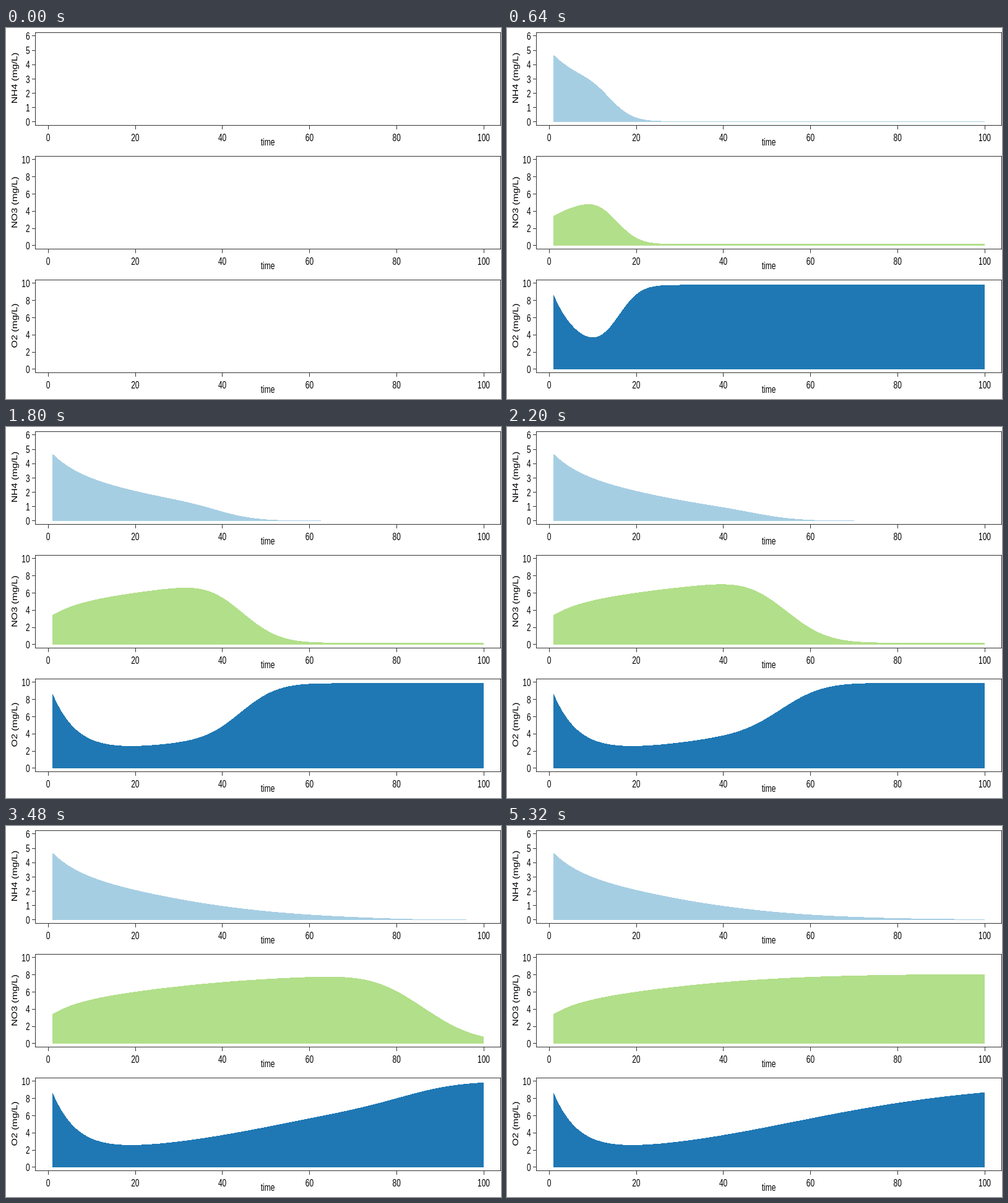
Write an HTML page that moves like this. It is 800x600 px and loops after 6040 ms.

```html
<!DOCTYPE html>
<html lang="en">
<head>
<meta charset="utf-8">
<title>Nitrification along a stream</title>
<style>
  html, body { margin: 0; width: 100%; height: 100%; overflow: hidden; background: #fff; }
  svg { display: block; width: 100vw; height: 100vh; }
  text { font: 16px "Liberation Sans", Arial, sans-serif; fill: #000; }
  .line { fill: none; stroke: #333; shape-rendering: crispEdges; }
  .area { shape-rendering: crispEdges; }
</style>
</head>
<body>
<svg id="stage" viewBox="0 0 800 600" preserveAspectRatio="none"></svg>
<script>
const STEP = 40, LOOP = 6040, LAST = 133, BOXES = 100;
const LEFT = 47.3, RIGHT = 799.5, TOP = 7.2, HEIGHT = 150, ZERO = 151.64, SPAN = 138.9;
const ASPECT = 0.75; // the page is a 16:9 plot squeezed to 4:3

const panels = [
  { name: 'NH4', max: 6, tick: 1, color: '#a6cee3', labelY: 81 },
  { name: 'NO3', max: 10, tick: 2, color: '#b2df8a', labelY: 282 },
  { name: 'O2', max: 10, tick: 2, color: '#1f78b4', labelY: 481.5 }
];

// Stream as a chain of mixed boxes: inflow, nitrification, reaeration
const INFLOW = [5, 3.1, 10], START = [0.1, 0.1, 10];
const RATE = 0.11, HALF = 5.5, O2_USE = 4.3, AERATION = 0.043, O2_SAT = 10;

function slope(state) {
  const [nh4, , o2] = state;
  const out = state.map((c, s) => c.map((v, i) => (i ? c[i - 1] : INFLOW[s]) - v));
  for (let i = 0; i < BOXES; i++) {
    const r = RATE * nh4[i] * o2[i] / (o2[i] + HALF);
    out[0][i] -= r;
    out[1][i] += r;
    out[2][i] += AERATION * (O2_SAT - o2[i]) - O2_USE * r;
  }
  return out;
}

const add = (a, b, k) => a.map((c, s) => c.map((v, i) => v + k * b[s][i]));

function rungeKutta(y, h) {
  const a = slope(y);
  const b = slope(add(y, a, h / 2));
  const c = slope(add(y, b, h / 2));
  const d = slope(add(y, c, h));
  return add(add(add(add(y, a, h / 6), b, h / 3), c, h / 3), d, h / 6);
}

const states = [START.map(v => Array(BOXES).fill(v))];
while (states.length < LAST) {
  let y = states[states.length - 1];
  for (let k = 0; k < 4; k++) y = rungeKutta(y, 0.25);
  states.push(y);
}

const stage = document.getElementById('stage');

function make(tag, attrs, content) {
  const el = document.createElementNS('http://www.w3.org/2000/svg', tag);
  for (const key in attrs) el.setAttribute(key, attrs[key]);
  if (content !== undefined) el.textContent = content;
  stage.append(el);
  return el;
}

function label(content, x, y, anchor = 'middle', turn = 0) {
  make('text', {
    'text-anchor': anchor,
    transform: `translate(${x} ${y}) scale(${ASPECT} 1) rotate(${turn})`
  }, content);
}

const px = x => 68 + 7.04 * x;

panels.forEach((p, n) => {
  const dy = 200 * n, bottom = TOP + HEIGHT + dy;
  p.y = v => ZERO + dy - v * SPAN / p.max;
  p.area = make('path', { class: 'area', fill: p.color });

  let d = `M${LEFT} ${TOP + dy}H${RIGHT}V${bottom}H${LEFT}Z`;
  for (let x = 0; x <= 100; x += 20) {
    d += `M${px(x) + 0.2} ${bottom}v7`;
    label(x, px(x), 183 + dy);
  }
  for (let v = 0; v <= p.max; v += p.tick) {
    d += `M${LEFT} ${p.y(v) + 0.2}h-5.3`;
    label(v, 38.7, p.y(v) + 6.4, 'end');
  }
  make('path', { class: 'line', d });
  label('time', 423, 190.3 + dy);
  label(`${p.name} (mg/L)`, 18, p.labelY, 'middle', -90);
});

let shown = -1;

function draw(now) {
  const step = Math.min(LAST, Math.floor((now % LOOP) / STEP));
  if (step !== shown) {
    shown = step;
    panels.forEach((p, n) => {
      let d = '';
      if (step) {
        const top = states[step - 1][n].map((v, i) => `${px(i + 1)} ${p.y(v).toFixed(2)}`);
        d = `M${px(1)} ${p.y(0)}L${top.join('L')}V${p.y(0)}Z`;
      }
      p.area.setAttribute('d', d);
    });
  }
}

const begin = performance.now();
function tick() {
  draw(performance.now() - begin);
  requestAnimationFrame(tick);
}
tick();
</script>
</body>
</html>
```
